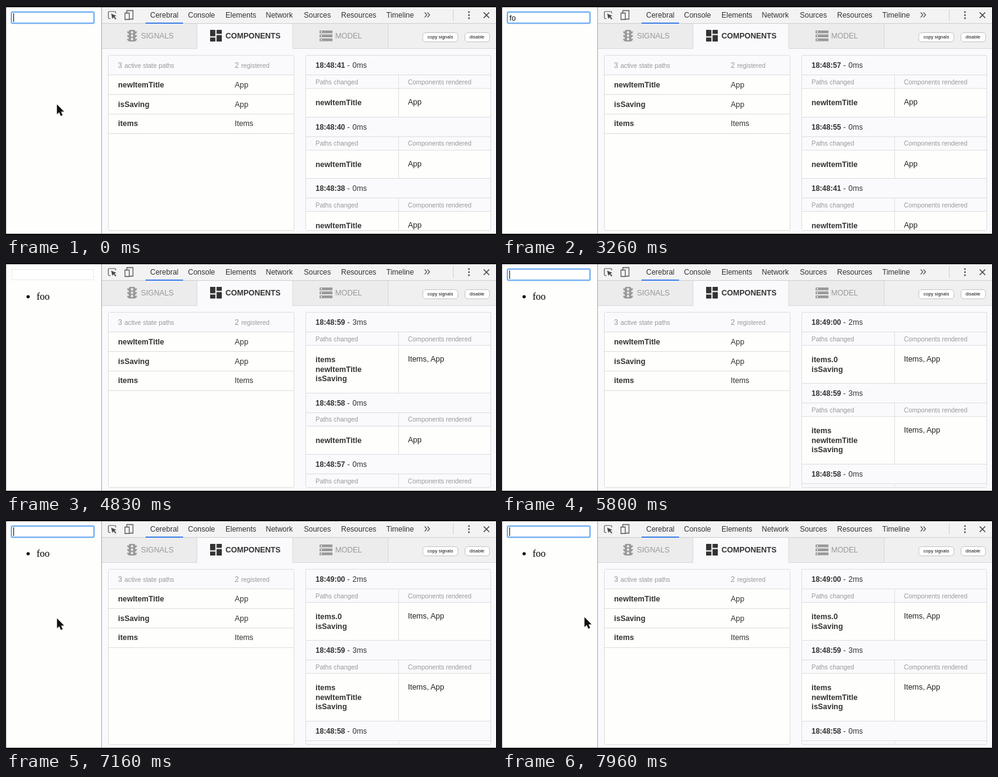
Recreate the animation shown at these times as an HTML page. Size 797x374 px, loop 8000 ms.

```html
<!DOCTYPE html>
<html lang="en">
<head>
<meta charset="utf-8">
<title>State debugger</title>
<style>
  html, body { margin: 0; width: 100%; height: 100%; overflow: hidden; background: #fefefd; }
  svg { display: block; width: 797px; height: 374px; }
  text { font-family: "Liberation Sans", Arial, sans-serif; white-space: pre; }
  .serif { font-family: "Liberation Serif", Times, serif; }
</style>
</head>
<body>
<svg id="stage" viewBox="0 0 797 374"></svg>
<script>
const LOOP = 8000;
const LINE = '#dedee0', PALE = '#fafafd', WHITE = '#fefefc', GRAY = '#999', DARK = '#333';

const rect = (x, y, w, h, fill, more = '') =>
  `<rect x="${x}" y="${y}" width="${w}" height="${h}" fill="${fill}" ${more}/>`;
const text = (x, y, str, size, fill = DARK, more = '') =>
  `<text x="${x}" y="${y}" font-size="${size}" fill="${fill}" ${more}>${str}</text>`;
const bold = (x, y, str, size, fill = DARK) => text(x, y, str, size, fill, 'font-weight="700"');
const path = (d, stroke, width = 1, fill = 'none') =>
  `<path d="${d}" stroke="${stroke}" stroke-width="${width}" fill="${fill}"/>`;
const dot = (x, y, r, fill) => `<circle cx="${x}" cy="${y}" r="${r}" fill="${fill}"/>`;

function toolbar() {
  const tabs = [['Cerebral', 234.5], ['Console', 296], ['Elements', 357], ['Network', 422.5],
    ['Sources', 484.5], ['Resources', 545], ['Timeline', 618.5]];
  return rect(156, 2, 641, 26, '#f3f3f3') + rect(156, 28, 641, 1, '#cfcfcf') +
    path('M170 20.5H168Q166.500 20.5 166.5 19V10.500Q166.500 9 168 9H177Q178.500 9 178.5 10.500V12', '#5a5a5a', 1.2) +
    path('M171 12.500L179.500 16L176.300 17.200L179.500 20.800L178 22L175 18.500L173 21Z', 'none', 0, '#4a4a4a') +
    path('M196.500 11V7.500H206.500V21.500H201', '#5a5a5a', 1.3) +
    path('M193.500 11.500H200.500V22H193.500Z', '#5a5a5a', 1.3, '#f3f3f3') +
    tabs.map(([name, x]) => text(x, 19.3, name, 12)).join('') +
    rect(227, 27, 61, 2, '#3f82e8') +
    path('M681 10.500L684.500 14.500L681 18.500M685.500 10.500L689 14.500L685.500 18.500', '#555', 1.3) +
    rect(727, 6, 1, 18, '#d0d0d0') +
    [10, 15, 20].map(y => dot(753, y, 1.4, '#555')).join('') +
    path('M777 10.500L786 19.500M786 10.500L777 19.500', '#444', 1.5);
}

function trafficIcon() {
  const wings = [0, 6, 12].map(d =>
    `<path d="M197 ${41.5 + d}H213Q213 ${45 + d} 209 ${46 + d}H201Q197 ${45 + d} 197 ${41.5 + d}Z" fill="${GRAY}"/>`);
  return wings.join('') + rect(200, 39, 10, 19, GRAY, 'rx="1.5"') +
    [43, 48.5, 54].map(y => dot(205, y, 2, '#ececec')).join('');
}

function button(x, w, label) {
  return rect(x + .5, 43.5, w, 15, '#fff', 'rx="4.5" stroke="#c4c4c4"') +
    text(x + 8, 53.4, label, 7.6, '#111');
}

function viewTabs() {
  const blocks = [[332, 39, 8.5, 10.5], [332, 51.5, 8.5, 6.5], [342.5, 39, 8.5, 6.5], [342.5, 47.5, 8.5, 10.5]];
  return rect(156, 29, 641, 40, '#ececed') + rect(622, 29, 175, 40, '#f0f0f1') +
    rect(156, 69, 641, 1, '#d8d8da') + rect(311, 29, 155, 41, PALE) +
    [310, 466, 621].map(x => rect(x, 29, 1, 41, '#d8d8da')).join('') +
    trafficIcon() + text(219.5, 53.3, 'SIGNALS', 12.3, GRAY) +
    blocks.map(b => rect(...b, DARK)).join('') + bold(357, 53.3, 'COMPONENTS', 12.5) +
    [40, 46.5, 53].map(y => rect(510, y, 21, 4.5, GRAY) + rect(512, y + 1.2, 2, 2, '#ececed')).join('') +
    text(535.5, 53.3, 'MODEL', 12.2, GRAY) +
    button(677.5, 57, 'copy signals') + button(746, 40, 'disable');
}

function pathTable() {
  const rows = [['newItemTitle', 'App'], ['isSaving', 'App'], ['items', 'Items']];
  return rect(166.5, 80.5, 302, 286, WHITE, `rx="2" stroke="${LINE}"`) +
    rect(167, 81, 301, 31, PALE) +
    text(182, 101, '3', 12.3, GRAY) + text(192.7, 101, 'active state paths', 10.4, GRAY) +
    text(372, 101, '2', 12.3, GRAY) + text(382.7, 101, 'registered', 10.3, GRAY) +
    rows.map(([key, comp], i) => rect(167, 112 + 32 * i, 301, 1, LINE) +
      bold(182.3, 132.8 + 31.8 * i, key, 12.4) + text(372, 132.8 + 31.8 * i, comp, 12.4)).join('') +
    rect(167, 208, 301, 1, LINE);
}

// One change record; its height grows with the number of changed paths.
function record(top, { time, ms = 0, paths = ['newItemTitle'], comps = 'App' }) {
  const y = Math.round(top), h = 85 + 15.5 * paths.length, end = Math.round(top + h);
  return rect(488, y, 300, 54, PALE) + rect(488, y + 54, 300, end - y - 54, WHITE) +
    [y, y + 32, y + 54, end].map(v => rect(488, v, 300, 1, LINE)).join('') +
    rect(638, y + 32, 1, end - y - 32, LINE) +
    bold(503.5, top + 21, '18:' + time, 12) + text(555, top + 21, '-', 12.4) +
    text(563.5, top + 21, ms + 'ms', 12.4) +
    text(503.5, top + 47.6, 'Paths changed', 10.4, GRAY) +
    text(653.7, top + 47.6, 'Components rendered', 10.4, GRAY) +
    paths.map((p, i) => bold(503.5, top + 82.3 + 15.5 * i, p, 12.4)).join('') +
    text(653.7, top + 81.3, comps, 12.5, '#222');
}

function history(list) {
  let top = 80, out = '';
  for (const item of list) {
    out += record(top, item);
    top += 85 + 15.5 * (item.paths || [0]).length;
  }
  return out;
}

// Newest last; a record is listed from its "at" time on.
const LOG = [
  { at: 0, time: '48:38' }, { at: 0, time: '48:40' }, { at: 0, time: '48:41' },
  { at: 1160, time: '48:55' }, { at: 2760, time: '48:57' }, { at: 3730, time: '48:58' },
  { at: 4790, time: '48:59', ms: 3, paths: ['items', 'newItemTitle', 'isSaving'], comps: 'Items, App' },
  { at: 5800, time: '49:00', ms: 2, paths: ['items.0', 'isSaving'], comps: 'Items, App' }
];
const TYPED = [[0, ''], [1100, 'f'], [2660, 'fo'], [3700, 'foo'], [4760, '']];
const CARET = [[0, 1], [330, 0], [830, 1], [1660, 0], [2160, 1], [3260, 0], [3700, 1], [4200, 0],
  [4700, 1], [4760, 0], [5800, 1], [6300, 0], [6800, 1], [7300, 0], [7800, 1]];
const CARET_X = [12, 16, 22, 29.5];
const POINTER = [[7160, 83, 161], [7360, 108, 161], [7530, 131, 159.5], [7800, 131, 159.5], [7960, 134.3, 159]];

const stage = document.getElementById('stage');
stage.innerHTML =
  rect(0, 0, 797, 374, WHITE) + rect(0, 2, 1, 370, '#c8c8c8') +
  rect(156, 29, 641, 343, PALE) + toolbar() + viewTabs() + rect(155, 2, 1, 370, '#a9a9a9') +
  pathTable() +
  '<clipPath id="clip"><rect x="487" y="80" width="302" height="286"/></clipPath>' +
  rect(487.5, 80.5, 301, 286, WHITE, 'rx="2"') + '<g id="log" clip-path="url(#clip)"></g>' +
  rect(487.5, 80.5, 301, 286, 'none', `rx="2" stroke="${LINE}"`) +
  rect(9.5, 10.5, 133, 17, '#fff', 'stroke="#e9e9e9"') +
  '<g id="ring">' + rect(7.5, 8.5, 137, 21, 'none', 'rx="3" stroke="#d3e6fb"') +
  rect(9, 10, 134, 18, '#fff', 'rx="1.5" stroke="#74b0f4" stroke-width="2"') + '</g>' +
  text(12, 23.5, '', 12.5, '#111', 'id="typed"') + rect(12, 12, 1, 14, '#000', 'id="caret"') +
  '<g id="item">' + dot(36, 55, 2.6, '#000') + text(49.7, 60, 'foo', 16, '#000', 'class="serif"') + '</g>' +
  '<g id="pointer">' +
  path('M0 0V15.500L3.500 12.300L6.200 18.300L8.800 17.200L6.200 11.300H11Z', '#fff', 2, '#fff') +
  path('M0 0V15.500L3.500 12.300L6.200 18.300L8.800 17.200L6.200 11.300H11Z', '#111', .4, '#111') + '</g>' +
  rect(0, 0, 797, 2, '#000') + rect(0, 372, 797, 2, '#000');

const el = id => document.getElementById(id);
const show = (id, on) => el(id).setAttribute('visibility', on ? 'visible' : 'hidden');
const valueAt = (steps, t) => steps.filter(s => s[0] <= t).pop()[1];

function pointerAt(t) {
  if (t < 1100) return [83, 161];
  if (t < POINTER[0][0]) return null;
  const next = POINTER.findIndex(p => p[0] > t);
  if (next < 0) return POINTER[POINTER.length - 1].slice(1);
  const a = POINTER[next - 1], b = POINTER[next], k = (t - a[0]) / (b[0] - a[0]);
  return [a[1] + (b[1] - a[1]) * k, a[2] + (b[2] - a[2]) * k];
}

let listed = 0;
function draw(t) {
  const log = LOG.filter(r => r.at <= t);
  if (log.length !== listed) {
    listed = log.length;
    el('log').innerHTML = history(log.reverse().slice(0, 3));
  }
  const typed = valueAt(TYPED, t);
  el('typed').textContent = typed;
  el('caret').setAttribute('x', CARET_X[typed.length]);
  show('caret', valueAt(CARET, t));
  show('ring', t < 4760 || t >= 5800);
  show('item', t >= 4790);
  const pos = pointerAt(t);
  show('pointer', pos);
  if (pos) el('pointer').setAttribute('transform', `translate(${pos})`);
}

const start = performance.now();
function tick() {
  draw((performance.now() - start) % LOOP);
  requestAnimationFrame(tick);
}
tick();
</script>
</body>
</html>
```
